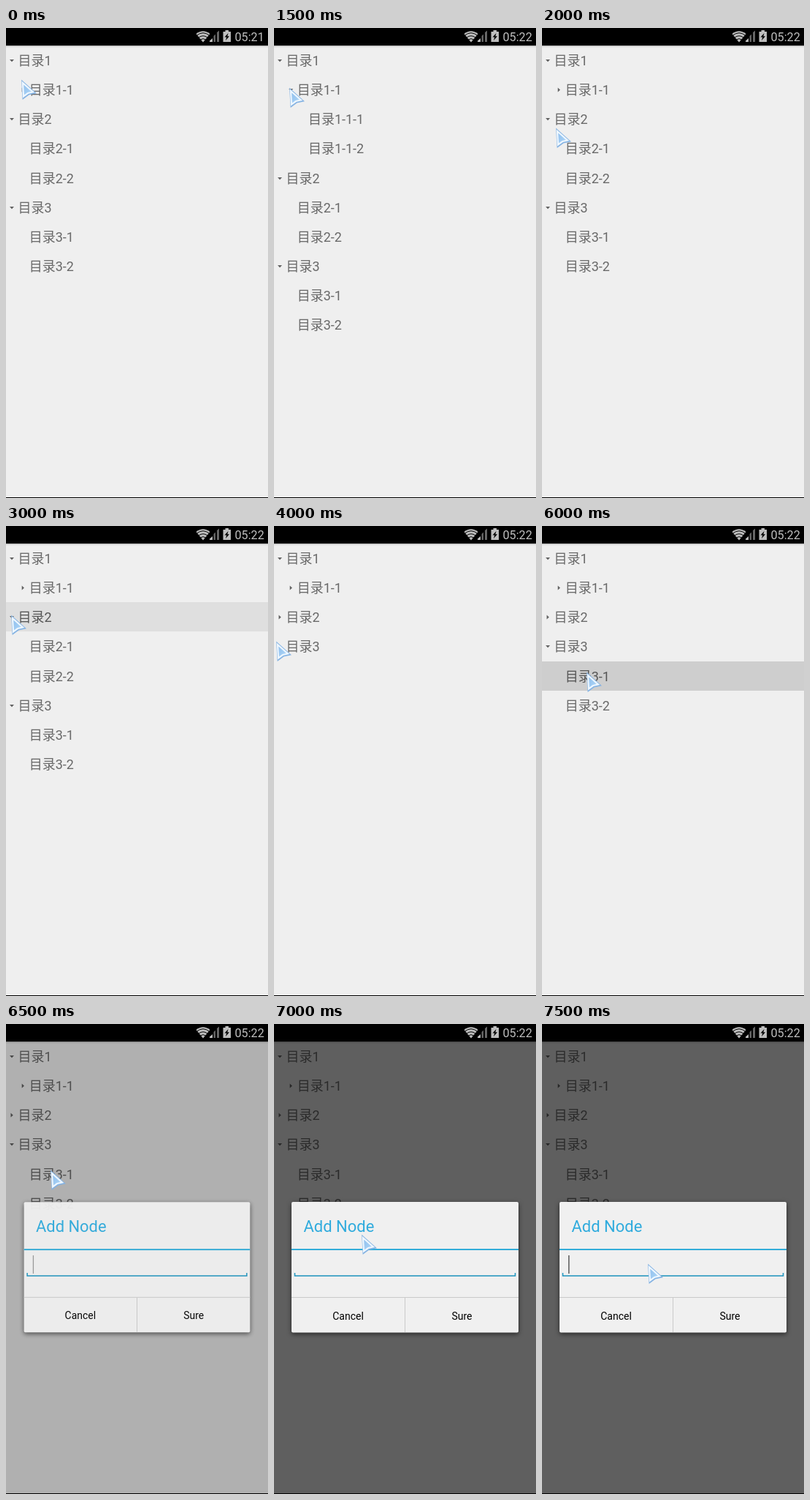
An HTML page that plays this animation: 359x642 px, repeating every 8 s.

```html
<!DOCTYPE html>
<html lang="zh-CN">
<head>
<meta charset="utf-8">
<title>Tree list</title>
<style>
  html, body { margin: 0; width: 100%; height: 100%; overflow: hidden; background: #efefef; }
  svg { display: block; font-family: Roboto, "Noto Sans CJK SC", "Noto Sans CJK", sans-serif; }
  #tree text { font-size: 18px; fill: #696969; }
  #tree .pressed text { fill: #555; }
  #tree path { fill: #606060; }
  #dialog { transform-origin: 179.5px 332px; }
  #panel { filter: drop-shadow(0 2px 3px rgba(0, 0, 0, .6)); }
  #cursor path { stroke-linejoin: round; }
  .button { font-size: 14px; text-anchor: middle; fill: #000; }
</style>
</head>
<body>
<svg width="359" height="642" viewBox="0 0 359 642">
  <defs>
    <linearGradient id="ice" x1="0" y1="0" x2="1" y2="1">
      <stop offset="0" stop-color="#8dbdec"/>
      <stop offset=".6" stop-color="#a3cef4"/>
      <stop offset="1" stop-color="#cfe6fa"/>
    </linearGradient>
    <path id="pointer" d="M2 2 L16 14.500 L9 16 L3 20.500 Z"/>
  </defs>
  <rect width="359" height="642" fill="#efefef"/>
  <g id="tree"></g>
  <rect id="dim" y="24" width="359" height="617"/>
  <rect y="24" width="359" height="2" fill="#000" opacity=".12"/>
  <rect y="641" width="359" height="1" fill="#000"/>

  <g id="status">
    <rect width="359" height="24" fill="#000"/>
    <path d="M260.500 8 Q270 0.500 279.500 8 L270 19.500 Z" fill="#bebebe"/>
    <g fill="none" stroke="#000" stroke-width="1">
      <path d="M261.500 10 Q270 3.500 278.500 10"/>
      <path d="M264 13 Q270 8.500 276 13"/>
      <path d="M266.500 16 Q270 13.200 273.500 16"/>
    </g>
    <path d="M279 19 V17.500 L283 14 V19 Z" fill="#bebebe"/>
    <path d="M284.500 19 V11 L287 8.500 V19 Z M289 19 V6 L292 3.500 V19 Z" fill="#666"/>
    <path d="M297.500 5 H300.500 V3 H305 V5 H308 V19 H297.500 Z" fill="#bebebe"/>
    <path d="M304.500 7 L299.500 12.500 H302.200 L301 17 L306 11.300 H303.300 Z" fill="#000"/>
    <text id="clock" x="313.500" y="18" font-size="16.200" fill="#bebebe"></text>
  </g>

  <g id="dialog">
    <rect id="panel" x="24" y="243" width="311" height="178.500" rx="2" fill="#f0f0f0"/>
    <text x="40.500" y="284" font-size="22" fill="#2fabdd">Add Node</text>
    <rect x="24" y="307" width="311" height="2" fill="#33add9"/>
    <path d="M28.500 340 V344 H330.500 V340" fill="none" stroke="#1c93bd" stroke-width="1.500"/>
    <rect id="caret" x="36.200" y="316" width="1.300" height="25"/>
    <path d="M24 373.500 H335 M179.500 374 V421" stroke="#cacaca"/>
    <text class="button" x="101.500" y="403.500">Cancel</text>
    <text class="button" x="257.500" y="403.500">Sure</text>
  </g>

  <g id="cursor">
    <use href="#pointer" x=".5" y=".5" fill="none" stroke="#84b2e2" stroke-width="4.200"/>
    <use href="#pointer" fill="url(#ice)" stroke="#eef7ff" stroke-width="2.200"/>
  </g>
</svg>
<script>
const STEP = 500;
const LOOP = 8000;
const ROW = 40.15;
const TOP = 24;
const $ = id => document.getElementById(id);

const nodes = ['1', '1-1', '1-1-1', '1-1-2', '2', '2-1', '2-2', '3', '3-1', '3-2'];

// Each entry applies from its step until the same key is set again.
const changes = {
  0: { cursor: [21, 73], closed: ['1-1'], clock: '05:21', dim: 0, panel: 0, caret: 'none', pressed: '' },
  1: { cursor: [21, 82] },
  2: { closed: [] },
  3: { cursor: [21, 84], clock: '05:22' },
  4: { cursor: [19, 139], closed: ['1-1'] },
  5: { cursor: [12, 148] },
  6: { cursor: [7, 124], pressed: '2', shade: '#dfdfdf' },
  7: { cursor: [0, 162], closed: ['1-1', '2'], pressed: '' },
  8: { cursor: [3, 160], closed: ['1-1', '2', '3'] },
  9: { cursor: [7, 164] },
  10: { closed: ['1-1', '2'] },
  11: { cursor: [61, 202] },
  12: { pressed: '3-1', shade: '#cecece' },
  13: { pressed: '', dim: .265, panel: .95, scale: .996, caret: '#999' },
  14: { cursor: [120, 290], dim: .6, panel: 1, scale: 1, caret: 'none' },
  15: { cursor: [145, 330], caret: '#444' }
};

function stateAt(step) {
  const state = {};
  for (let i = 0; i <= step; i++) Object.assign(state, changes[i]);
  return state;
}

function arrow(x, y, closed) {
  const shape = closed ? 'm-1.500 -3 l3.200 3 l-3.200 3 z' : 'm-3 -1.500 h6 l-3 3.200 z';
  return `<path d="M${x} ${y} ${shape}"/>`;
}

function treeMarkup({ closed, pressed, shade }) {
  const visible = nodes.filter(n => !closed.some(c => n.startsWith(c + '-')));
  return visible.map((name, i) => {
    const y = Math.round(TOP + i * ROW);
    const indent = 15.2 * (name.split('-').length - 1);
    const isParent = nodes.some(n => n.startsWith(name + '-'));
    const down = name === pressed;
    return `<g class="${down ? 'pressed' : ''}">` +
      (down ? `<rect y="${y}" width="359" height="40" fill="${shade}"/>` : '') +
      (isParent ? arrow(8 + indent, y + 20.5, closed.includes(name)) : '') +
      `<text x="${16.5 + indent}" y="${y + 27}">目录${name}</text></g>`;
  }).join('');
}

function render(step) {
  const s = stateAt(step);
  $('tree').innerHTML = treeMarkup(s);
  $('clock').textContent = s.clock;
  $('dim').setAttribute('opacity', s.dim);
  $('dialog').style.opacity = s.panel;
  $('dialog').style.transform = `scale(${s.scale || 1})`;
  $('caret').setAttribute('fill', s.caret);
  $('cursor').setAttribute('transform', `translate(${s.cursor})`);
}

const start = performance.now();
let shown = -1;
function tick() {
  const step = Math.floor((performance.now() - start) % LOOP / STEP);
  if (step !== shown) render(shown = step);
  requestAnimationFrame(tick);
}
tick();
</script>
</body>
</html>
```
